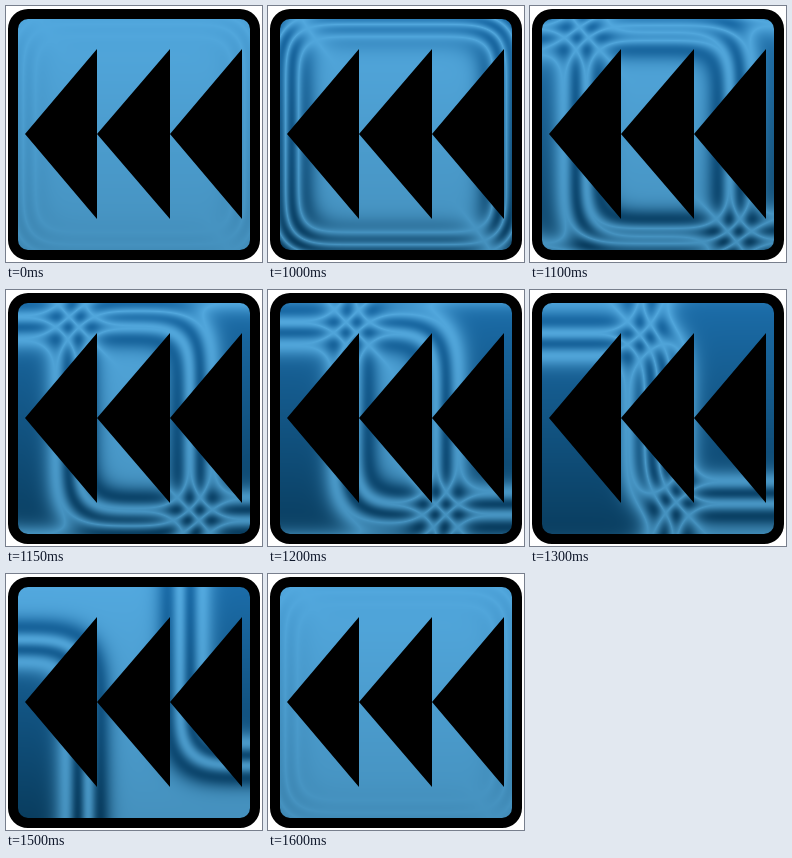
Write an HTML page with a canvas that moves like this. It is 256 by 256 pixels and loops after 1.65 s.

```html
<!DOCTYPE html>
<html lang="en">
<head>
<meta charset="utf-8">
<title>Rewind button</title>
<style>
  html, body { margin: 0; width: 100%; height: 100%; overflow: hidden; background: #fff; }
  canvas, svg { position: absolute; left: 0; top: 0; width: 256px; height: 256px; }
</style>
</head>
<body>
<canvas id="sheen" width="256" height="256"></canvas>
<svg viewBox="0 0 256 256">
  <path fill-rule="evenodd" d="M22 3H234A20 20 0 0 1 254 23V234A20 20 0 0 1 234 254H22A20 20 0 0 1 2 234V23A20 20 0 0 1 22 3Z
    M22 13A10 10 0 0 0 12 23V234A10 10 0 0 0 22 244H234A10 10 0 0 0 244 234V23A10 10 0 0 0 234 13Z"/>
  <path d="M19 128L91 43V213ZM91 128L164 43V213ZM164 128L236 43V213Z"/>
</svg>
<script>
const LOOP = 1650, HOLD = 1000, STEP = 50, MOVES = 12;
const LEFT = 12, TOP = 13, END = 244, BLUR = 21;
const SLOPE = Math.tan(19 * Math.PI / 180);
const LIGHT = [[82, 168, 222], [69, 145, 190]];
const DARK = [[27, 108, 168], [9, 61, 95]];

const ctx = document.getElementById('sheen').getContext('2d');
const width = END - LEFT, height = END - TOP;
const image = ctx.createImageData(width, height);

const mix = (a, b, t) => a + (b - a) * t;

// Normal distribution, logistic approximation
const normal = z => 1 / (1 + Math.exp(-1.5976 * z - 0.07056 * z ** 3));

// Coverage of a blurred, shifted bar along one axis
function softBar(from, count, shift) {
  return Float64Array.from({ length: count }, (_, i) => {
    const p = from + i + 0.5 - shift;
    return normal((p - from) / BLUR) - normal((p - END) / BLUR);
  });
}

// Ring contour: two and a half waves from outside to inside
const ring = a => (1 - Math.cos(5 * Math.PI * a)) / 2;

// Satin sheen: difference of two blurred squares sliding apart
function draw(shift) {
  const rise = shift * SLOPE;
  const ax = softBar(LEFT, width, -shift), ay = softBar(TOP, height, rise);
  const bx = softBar(LEFT, width, shift), by = softBar(TOP, height, -rise);
  let i = 0;
  for (let y = 0; y < height; y++) {
    const t = y / (height - 1);
    const light = LIGHT[0].map((c, n) => mix(c, LIGHT[1][n], t));
    const dark = DARK[0].map((c, n) => mix(c, DARK[1][n], t));
    for (let x = 0; x < width; x++) {
      const shade = Math.abs(ring(ax[x] * ay[y]) - ring(bx[x] * by[y]));
      for (let n = 0; n < 3; n++) image.data[i++] = mix(light[n], dark[n], shade);
      image.data[i++] = 255;
    }
  }
  ctx.putImageData(image, LEFT, TOP);
}

let shown = null;
function tick() {
  const time = performance.now() % LOOP;
  const step = Math.floor((time - HOLD) / STEP);
  const shift = step >= 0 && step < MOVES ? 7 + 16 * step : 0.5;
  if (shift !== shown) draw(shown = shift);
  requestAnimationFrame(tick);
}
tick();
</script>
</body>
</html>
```
